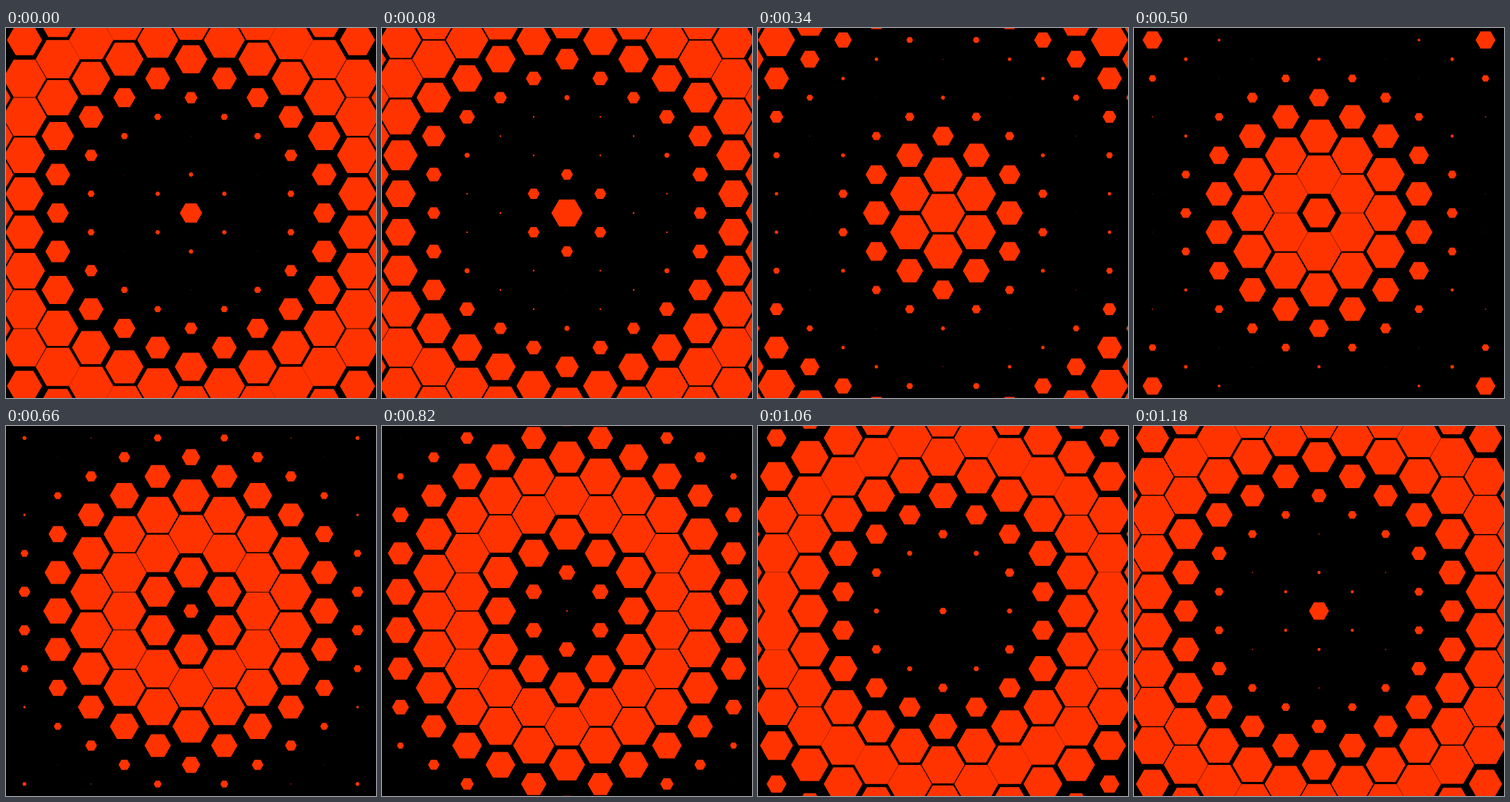
An HTML page with a canvas that plays this animation: 500x500 px, repeating every 1200 ms.

```html
<!DOCTYPE html>
<html lang="en">
<head>
<meta charset="utf-8">
<title>Hexagon ripple</title>
<style>
  html, body { margin: 0; width: 100%; height: 100%; overflow: hidden; background: #000; }
  canvas { display: block; width: 500px; height: 500px; }
</style>
</head>
<body>
<canvas id="stage" width="500" height="500"></canvas>
<script>
  const SIZE = 500, MID = SIZE / 2, LOOP = 1200;
  const R = 30, COL = R * 1.5, ROW = R * Math.sqrt(3);
  const RAD = Math.PI / 180;
  const ctx = document.getElementById('stage').getContext('2d');

  const corners = Array.from({ length: 6 }, (_, i) =>
    [Math.cos(i * 60 * RAD), Math.sin(i * 60 * RAD)]);

  const cells = [];
  for (let c = -6; c <= 6; c++) {
    const shift = c % 2 ? 0.5 : 0;
    for (let r = -6; r <= 6; r++) {
      const x = c * COL, y = (r + shift) * ROW;
      cells.push({ x: MID + x, y: MID + y, lag: Math.hypot(x, y) * RAD });
    }
  }

  function hexagon(x, y, r) {
    ctx.beginPath();
    for (const [cx, cy] of corners) ctx.lineTo(x + cx * r, y + cy * r);
    ctx.fill();
  }

  // The wave lags by one degree per pixel from the centre.
  function draw(now) {
    const phase = (now % LOOP) / LOOP * 2 * Math.PI;
    ctx.fillStyle = '#000';
    ctx.fillRect(0, 0, SIZE, SIZE);
    ctx.fillStyle = '#f30';
    for (const { x, y, lag } of cells) {
      hexagon(x, y, R / 2 * (1 + Math.sin(phase - lag)));
    }
    requestAnimationFrame(draw);
  }

  draw(0);
</script>
</body>
</html>
```
